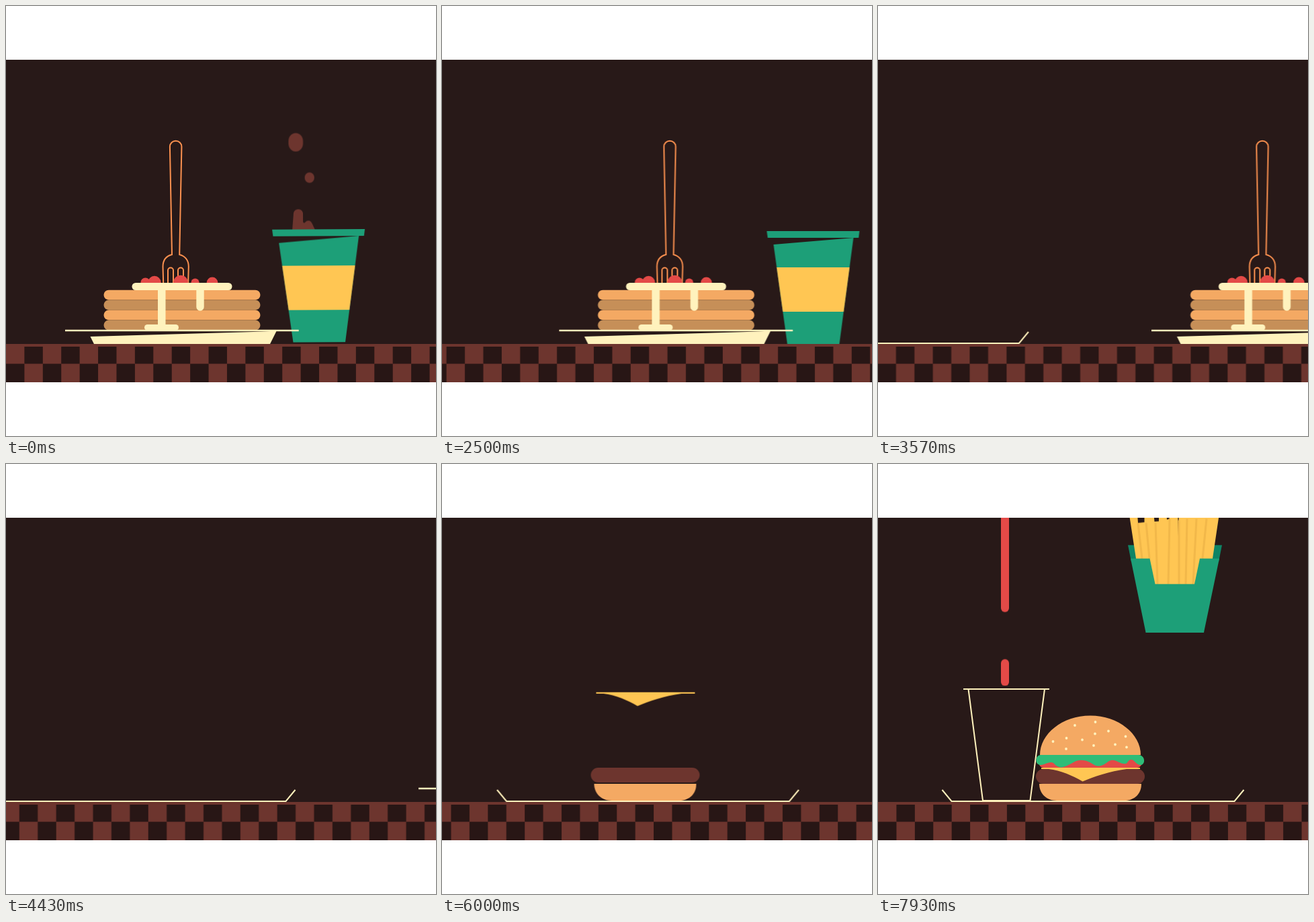
Recreate the animation shown at these times as an HTML page without scripts. Size 640 px wide and 640 px high, loop 8000 ms.

```html
<!DOCTYPE html>
<html lang="en">
<head>
<meta charset="utf-8">
<title>Pancakes to burger</title>
<style>
  html, body { margin: 0; width: 100%; height: 100%; overflow: hidden; background: #fff; }
  svg { display: block; width: 100vw; height: 100vh; }

  .dark { fill: #281918; }
  .brown { fill: #6d352e; }
  .cream { fill: #fff2bd; }
  .dough { fill: #f4a963; }
  .crust { fill: #c68f58; }
  .red { fill: #e34a47; }
  .green { fill: #1d9f78; }
  .shade { fill: #0f8465; }
  .leaf { fill: #2fbd78; }
  .yellow { fill: #ffc653; }
  .line { fill: none; stroke: #fff2bd; stroke-width: 2; }
  .fork { fill: none; stroke: #fb9150; stroke-width: 2; }
  .check { fill: none; stroke: #281615; stroke-dasharray: 27.415; }
  .stripe { fill: none; stroke: #f2b84a; stroke-width: 3; }
  .seeds { fill: none; stroke: #fff2bd; stroke-width: 3.8; stroke-linecap: round; }

  /* horizontal travel: the table runs twelve tiles, the food one stage width */
  .table, .breakfast, .lunch { animation: 8s infinite; }
  .table { animation-name: table; }
  .breakfast { animation-name: leave; }
  .lunch { animation-name: arrive; }
  @keyframes table {
    0% { transform: translateX(0); animation-timing-function: cubic-bezier(.742, 0, .242, 1); }
    90.4%, 100% { transform: translateX(657.96px); }
  }
  @keyframes leave {
    0% { transform: translateX(0); animation-timing-function: cubic-bezier(.742, 0, .242, 1); }
    90.4%, 100% { transform: translateX(640px); }
  }
  @keyframes arrive {
    0% { transform: translateX(-640px); animation-timing-function: cubic-bezier(.742, 0, .242, 1); }
    90.4%, 100% { transform: translateX(0); }
  }

  /* coffee splashing back */
  .coffee { transform-origin: 466px 503px; animation: settle 8s infinite; }
  @keyframes settle {
    0% { transform: translateY(-2.6px) rotate(-.3deg); }
    2.2%, 100% { transform: none; }
  }
  .splash { animation: splash 8s infinite; }
  @keyframes splash {
    0% { transform: none; animation-timing-function: cubic-bezier(.33, 0, .67, .33); }
    4.5%, 100% { transform: translateY(150px); }
  }

  /* burger layers: --at is when each starts to fall */
  .drop { animation: drop 8s calc(var(--at) - 8s) infinite; }
  .drop path { animation: 8s calc(var(--at) - 8s) infinite; }
  @keyframes drop {
    0% { transform: translateY(-480px); animation-timing-function: cubic-bezier(.33, 0, .67, .33); }
    7.125%, 40% { transform: none; }
    40.01%, 100% { transform: translateY(-480px); }
  }
  .drop .base { animation-name: base; }
  @keyframes base {
    0%, 7.125% { d: path("M240 471Q316 481 392 471C392 489 377 494 367 496.5Q316 506.5 266 496C252 493 240 485 240 471Z"); }
    8.4%, 100% { d: path("M240 476Q316 476 392 476C392 494 378 501 367 501Q316 501 266 501C250 501 240 490 240 476Z"); }
  }
  .drop .patty { animation-name: patty; fill: none; stroke: #6d352e; stroke-width: 22; stroke-linecap: round; }
  @keyframes patty {
    0%, 7.125% { d: path("M246 457Q316 473 386 457"); }
    8.4%, 100% { d: path("M246 465Q316 465 386 465"); }
  }
  .drop .leaf { animation-name: leaf; }
  @keyframes leaf {
    0%, 7.125% { d: path("M243 407C258 410 270 435 319 435C350 435 370 426 391 418C401 417 401 426 393 429C380 435 379 437 382 443C385 452 375 451 369 450C357 449 349 448 344 456C340 470 329 466 321 463C309 456 295 450 284 452C272 453 266 456 260 454C252 451 257 444 256 440C255 432 242 430 238 414C237 409 240 407 243 407Z"); }
    8.6%, 100% { d: path("M243 433C268 433 292 433 316 433C340 433 365 433 388 433C398 434 398 446 392 448C384 449 382 439 376 440C370 442 373 447 365 446C356 444 352 438 344 442C336 448 330 452 322 448C312 441 301 438 291 444C280 450 272 455 264 448C259 440 252 446 243 448C237 448 235 444 235.5 440C236 435 239 433 243 433Z"); }
  }
  .drop .dome { animation-name: dome; }
  @keyframes dome {
    0%, 7.125% { d: path("M244 433C244 402 274 374.5 316 374.5C358 374.5 388 402 388 433Q316 445 244 433Z"); }
    8.4%, 100% { d: path("M241 433C241 402 274 374.5 316 374.5C358 374.5 391 402 391 433Q316 433 241 433Z"); }
  }
  .tilt { transform-origin: 316px 433px; animation: tilt 8s calc(var(--at) - 8s) infinite; }
  @keyframes tilt {
    0%, 7.125% { transform: translateX(2px) rotate(-5.2deg); }
    8.4%, 100% { transform: none; }
  }
  .press { animation: press 8s infinite; }
  @keyframes press {
    0%, 84.8% { transform: translateY(-2px); }
    86%, 100% { transform: none; }
  }

  .glass { transform-origin: 191px 501px; animation: glass 8s infinite; }
  @keyframes glass {
    0%, 75.35% { transform: translateY(-480px) rotate(-4.5deg); animation-timing-function: cubic-bezier(.33, 0, .67, .33); }
    82.475% { transform: translateY(0) rotate(-4.5deg); animation-timing-function: ease-out; }
    86.5% { transform: translateY(-26px) rotate(2deg); animation-timing-function: ease-in; }
    90.5% { transform: translateY(0) rotate(2deg); animation-timing-function: ease-out; }
    93.5% { transform: translateY(-6px) rotate(-2deg); animation-timing-function: ease-in; }
    96.5% { transform: translateY(0) rotate(-1.8deg); }
    99.1%, 100% { transform: none; }
  }
  .pour { animation: pour 8s infinite; }
  @keyframes pour {
    0%, 96.2% { transform: translateY(-340px); animation-timing-function: linear; }
    99.125% { transform: none; animation-timing-function: linear; }
    100% { transform: translateY(98px); }
  }
  .fries { animation: fries 8s infinite; }
  @keyframes fries {
    0%, 94.2% { transform: translateY(-230px); animation-timing-function: cubic-bezier(.33, 0, .67, .33); }
    100% { transform: translateY(88px); }
  }
</style>
</head>
<body>
<svg viewBox="0 0 640 640">
  <clipPath id="stage"><path d="M0 80H640V560H0Z"/></clipPath>
  <clipPath id="aboveLid"><path d="M380 80H560V336H380Z"/></clipPath>

  <g clip-path="url(#stage)">
    <path class="dark" d="M0 80H640V560H0Z"/>
    <path class="brown" d="M0 503H640V560H0Z"/>
    <g class="table">
      <path class="check" stroke-width="25.5" d="M-685.4 519.75H640"/>
      <path class="check" stroke-width="27.5" d="M-712.8 546.25H640"/>
    </g>

    <g class="breakfast">
      <g class="coffee">
        <g clip-path="url(#aboveLid)">
          <g class="splash brown">
            <rect x="422" y="191.5" width="21.6" height="27.5" rx="10.8" ry="12"/>
            <ellipse cx="453" cy="258" rx="7.2" ry="7.8"/>
            <path d="M427 336L429 311C430 303 442 303 443 311V324C446 328 446 322 451 322C456 322 457 328 461 336Z"/>
          </g>
        </g>
        <path class="green" d="M397 335H535L533.7 345H398.3ZM407 355L526 345L505 503H427.5Z"/>
        <path class="yellow" d="M411.7 389H520.2L511.4 455H420.9Z"/>
      </g>

      <path class="fork" d="M234.3 416L233.5 388C233.5 378 239 372 247 370L243.9 209.5A8.7 8.7 0 0 1 261.4 209.5L258.2 370C266 372 271.8 378 271.8 388L271 416M241 416V393.5a4 4 0 0 1 8 0V416M256 416V393.5a4 4 0 0 1 8 0V416"/>
      <g class="red">
        <circle cx="207.5" cy="411.5" r="7"/>
        <circle cx="221" cy="411.5" r="9.7"/>
        <circle cx="260" cy="411.5" r="10.8"/>
        <circle cx="281.5" cy="411.5" r="6"/>
        <circle cx="307" cy="411.8" r="8.3"/>
      </g>
      <rect class="dough" x="145.5" y="422.7" width="233" height="14.8" rx="7.4"/>
      <rect class="crust" x="145.5" y="437.5" width="233" height="15" rx="7.4"/>
      <rect class="dough" x="145.5" y="452.5" width="233" height="15" rx="7.4"/>
      <rect class="crust" x="145.5" y="467.5" width="233" height="14.8" rx="7.4"/>
      <g class="cream">
        <rect x="187.5" y="412" width="149" height="11" rx="5.5"/>
        <path d="M226 418H237.5V478H226Z"/>
        <rect x="206" y="474" width="51" height="9" rx="4.5"/>
        <path d="M283.3 418H294.7V448a5.7 5.7 0 0 1-11.4 0Z"/>
        <path d="M88 481.8H435.7V484.2H88ZM125.5 492L402.5 484L393 503H131Z"/>
      </g>
    </g>

    <g class="lunch">
      <g class="pour red">
        <rect x="183" y="-300" width="12" height="519" rx="6"/>
        <rect x="183" y="289" width="12" height="40" rx="6"/>
      </g>
      <path class="line glass" d="M127 335H255M134.5 335L156 501H226.5L248 335"/>

      <g class="fries">
        <path class="shade" d="M372 121H512L507 146H377Z"/>
        <path class="yellow" d="M374 76L386 74L387 88L396.5 87V72L410 70L411.5 86L418 85.5V68L429 68L430 83L433.5 82V62L446 64L447 108L448 64L462 66L476 64L490 68L508 74L498 141L480 182H404L384 141Z"/>
        <path class="stripe" d="M387 88L393 141M399 88L404 141M413 88L416 179M434 82L432 179M448 84V179M460 82L458 179M474 82L469 179M489 82L483 141"/>
        <path class="green" d="M376 141H404.5L412.5 179H471L479 141H508L485 251H398.5Z"/>
      </g>

      <g class="drop" style="--at: 4.806s">
        <path class="base dough"/>
      </g>
      <g class="press">
        <g class="drop" style="--at: 4.972s">
          <path class="patty"/>
        </g>
        <g class="drop" style="--at: 5.5s">
          <path class="yellow" d="M243 452H390V454H370C345 457 320 466 304.5 472.5C290 464 272 456 254 454H243Z"/>
        </g>
      </g>
      <g class="drop" style="--at: 6.01s">
        <rect class="red" x="239.5" y="438" width="153" height="14" rx="7"/>
      </g>
      <g class="drop" style="--at: 6.213s">
        <g class="tilt">
          <path class="dome dough"/>
          <path class="seeds" d="M293 389h0M323.5 384h0M280.5 408h0M260.5 413h0M304 410.5h0M323 401.5h0M343 397.5h0M368.5 405.5h0M280 424h0M321 419h0M353 417.5h0M370 421.5h0"/>
        </g>
      </g>
      <g class="drop" style="--at: 6.08s">
        <path class="leaf"/>
      </g>
      <path class="line" d="M95.5 485L109.5 502H530.5L544.5 485"/>
    </g>
  </g>
</svg>
</body>
</html>
```
